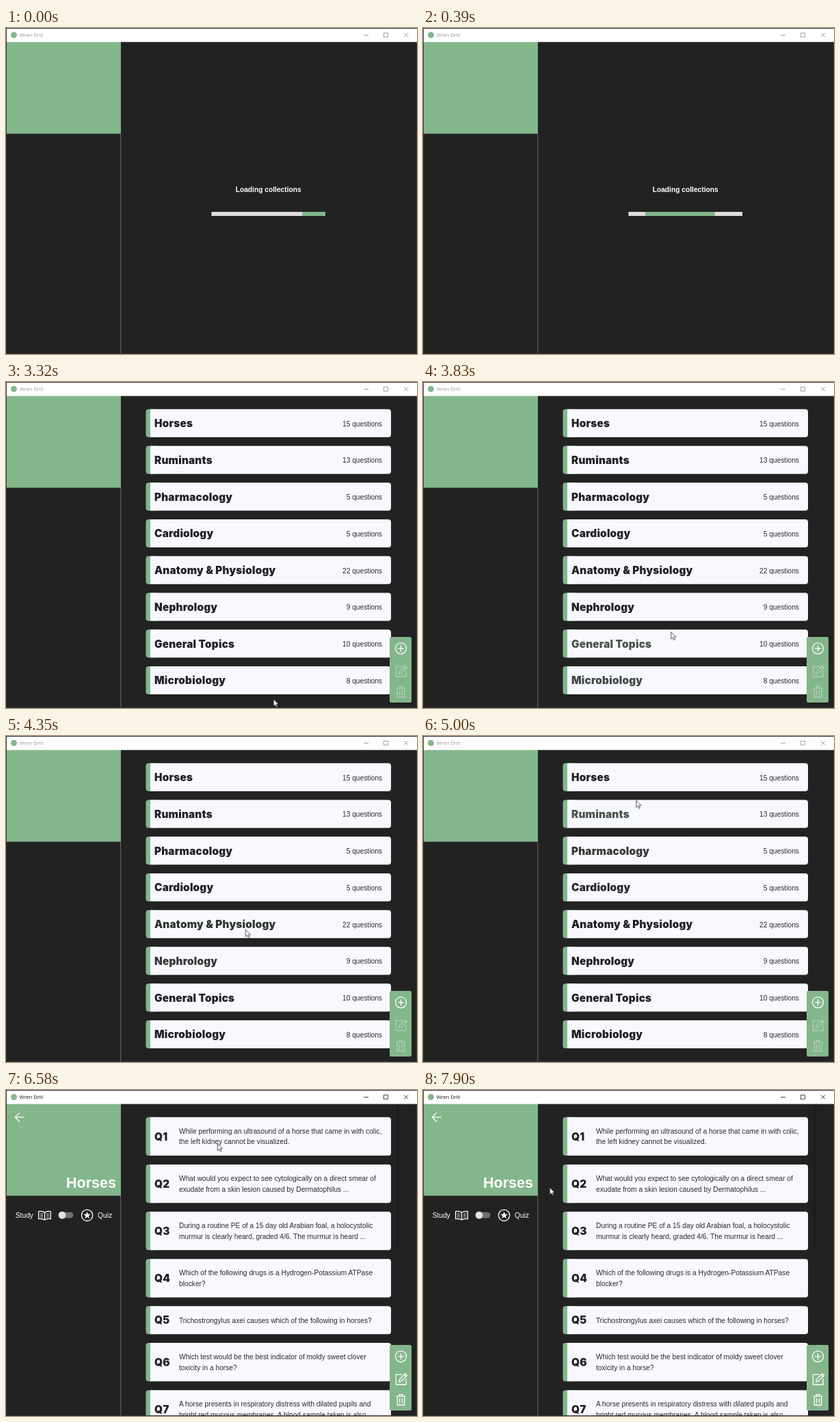
Write an HTML page that moves like this. It is 601 px wide and 477 px high and loops after 8000 ms.

```html
<!DOCTYPE html>
<html lang="en">
<head>
<meta charset="utf-8">
<title>Wren Drill</title>
<style>
  html, body { margin: 0; width: 100%; height: 100%; overflow: hidden; background: #222; }
  svg { display: block; width: 601px; height: 477px; }
  text { font: 10.24px "Liberation Sans", Arial, sans-serif; fill: #2a2a2c; white-space: pre; }
  .bold { font-weight: 700; fill: #fff; }
  .big { font-size: 21.5px; }
  .light { fill: #fff; }
  .black { font: 900 15.3px Inter, "Liberation Sans", sans-serif; letter-spacing: .2px; fill: #222224; }
  .app { font: 7.5px "Open Sans", "Noto Sans", sans-serif; }
  .green { fill: #84b68c; }
  .paper { fill: #f8f9ff; }
  .line { fill: none; stroke: #fff; stroke-width: 1.3; }

  /* one loop lasts 8 s: 1% = 80 ms */
  .loading, .list, .quiz, .panel, .tools, .tint, .ink, .cursor, .bar, .hover, .picked, .count {
    animation: 8s step-end infinite;
  }
  .loading { animation-name: loading; }
  .list { animation-name: list; }
  .quiz { animation-name: quiz; }
  .panel { animation-name: panel; }
  .tools { animation-name: tools; }
  .tint { animation-name: focus-fill; }
  .ink { animation-name: focus-line; fill: none; stroke-width: .8; }
  .cursor { animation-name: cursor; }
  .bar { animation-name: slide; }
  .bar.second { animation-name: enter; }
  .hover { animation-name: hover; animation-delay: calc((var(--at) - 8000) * 1ms); }
  .picked { animation-name: picked; }
  .count { animation-name: count; }

  @keyframes loading { 0% { opacity: 1 } 8.25%, to { opacity: 0 } }
  @keyframes list { 0% { opacity: 0 } 8.25% { opacity: 1 } 82.25%, to { opacity: 0 } }
  @keyframes quiz { 0% { opacity: 0 } 82.25%, to { opacity: 1 } }
  @keyframes panel { 0% { opacity: 0 } 8.25%, to { opacity: 1 } }
  @keyframes tools { 0% { opacity: .36 } 82.25%, to { opacity: 1 } }
  @keyframes focus-fill { 0% { fill: #999 } 75.75%, to { fill: #111 } }
  @keyframes focus-line { 0% { stroke: #888 } 75.75%, to { stroke: #111 } }

  @keyframes slide {
    0% { transform: translateX(132.5px) }
    1.625% { transform: translateX(155px) }
    3.25%, to { transform: translateX(167px) }
  }
  @keyframes enter {
    0% { transform: translateX(-167px) scaleX(.6) }
    1.625% { transform: translateX(-67px) scaleX(.6) }
    3.25% { transform: translateX(-10px) scaleX(.6) }
    4.875%, to { transform: translateX(25px) scaleX(.61) }
  }

  @keyframes hover {
    0% { fill: #303531 }
    1.625% { fill: #4a544c }
    3.25% { fill: #434944 }
    4.875% { fill: #363936 }
    6.5% { fill: #2a2c2a }
    8.125%, to { fill: #222224 }
  }
  @keyframes picked {
    0% { fill: #222224 }
    67.625% { fill: #3f4b42 }
    69.25% { fill: #5f7b66 }
    70.875% { fill: #84b68c }
    77.75%, to { fill: #9cc3a5 }
  }
  @keyframes count { 0% { fill: #2a2a2c } 77.75%, to { fill: #53625a } }

  @keyframes cursor {
    0% { transform: translate(-20px, 0) }
    41.5% { transform: translate(391px, 464px) }
    43% { transform: translate(383px, 436px) }
    44.625% { transform: translate(375px, 408px) }
    46.25% { transform: translate(367px, 384px) }
    47.875% { transform: translate(362.5px, 365.5px) }
    49.5% { transform: translate(359px, 340px) }
    51.125% { transform: translate(358px, 323px) }
    52.75% { transform: translate(356px, 312px) }
    54.375% { transform: translate(350px, 283px) }
    56% { transform: translate(342px, 232px) }
    57.625% { transform: translate(333px, 180px) }
    59.25% { transform: translate(325px, 143px) }
    60.875% { transform: translate(317px, 112px) }
    62.5% { transform: translate(311.5px, 94px) }
    64.125% { transform: translate(311px, 86px) }
    65.75% { transform: translate(309px, 78px) }
    87.25% { transform: translate(278px, 95px) }
    88.875% { transform: translate(222px, 123px) }
    90.5% { transform: translate(184.5px, 139px) }
    92.25% { transform: translate(184px, 142.5px) }
    98.75%, to { transform: translate(185px, 142.5px) }
  }
</style>
</head>
<body>
<svg viewBox="0 0 601 477">
  <defs><clipPath id="track"><rect x="300.5" y="269" width="166.5" height="6"/></clipPath></defs>
  <rect width="601" height="477" fill="#222"/>
  <path d="M167.7 155V476" stroke="#555" stroke-width="1.4"/>
  <rect class="green" x="1" y="20" width="167" height="134.7"/>

  <g class="loading">
    <text class="bold" x="383.7" y="240.3" text-anchor="middle">Loading collections</text>
    <g clip-path="url(#track)">
      <rect x="300" y="269" width="167" height="6" fill="#e0dcdf"/>
      <g transform="translate(300 269)">
        <rect class="bar green" width="167" height="6"/>
        <rect class="bar second green" width="167" height="6"/>
      </g>
    </g>
  </g>

  <g class="list" id="list"></g>

  <g class="quiz">
    <path class="line" d="M27 39.8H13.6M19.8 33.4L13.4 39.8L19.8 46.2"/>
    <text class="bold big" x="161" y="143" text-anchor="end">Horses</text>
    <text class="light" x="13.8" y="187">Study</text>
    <path class="line" stroke-linejoin="round" d="M56.5 179.3Q53 176.6 47.7 177.6V188.6Q53 187.8 56.5 190Q60 187.8 65.3 188.6V177.6Q60 176.6 56.5 179.3V190"/>
    <path class="line" style="stroke-width:.8" d="M50 180.8l4 .7M50 183.2l4 .7M50 185.6l4 .7M63 180.8l-4 .7M63 183.2l-4 .7M63 185.6l-4 .7"/>
    <rect x="77.5" y="178.8" width="21" height="8.6" rx="4.3" fill="#707070"/>
    <circle cx="82" cy="183.1" r="5.4" fill="#e4e4e4"/>
    <circle class="line" cx="118.6" cy="183.3" r="8.2"/>
    <path id="star" fill="#fff"/>
    <text class="light" x="134" y="187">Quiz</text>
    <rect x="570.5" y="21" width="4.5" height="207" fill="#1d1d1d"/>
    <g id="questions"></g>
  </g>

  <g class="panel">
    <rect class="green" x="561" y="373" width="32" height="96" rx="2"/>
    <g class="line">
      <circle cx="577.5" cy="389.8" r="8"/>
      <path d="M577.5 385.2v9.2M572.9 389.8h9.2"/>
      <g class="tools">
        <path d="M579.5 416.4H570.4V431H585V422.5"/>
        <path stroke-linejoin="round" d="M574.6 427l.8-3.6L583.8 415l2.7 2.7-8.4 8.4zM582 416.8l2.7 2.7"/>
        <path d="M571 448.2h13M575 448v-2.3h5V448M572.3 448.4V461h10.4V448.4M575.6 451v7.5M579.4 451v7.5"/>
      </g>
    </g>
  </g>

  <path d="M600.5 20V476.5H.5V.5H601" fill="none" stroke="#333"/>
  <rect x="1" y="1" width="600" height="19.5" fill="#fff"/>
  <circle class="green" cx="11.5" cy="10.2" r="4.5"/>
  <text class="app tint" x="19.8" y="13.2">Wren Drill</text>
  <path class="ink" d="M523 10.5h7M552.4 7.3h6v6h-6zM582 7.3l6 6M588 7.3l-6 6"/>

  <g class="cursor">
    <path transform="scale(.64)" d="M.5 .5V16.5L4.2 13L6.8 18.8L9.3 17.7L6.8 12H11.8Z" fill="#fff" stroke="#111" stroke-width="1.1"/>
  </g>
</svg>
<script type="module">
  const byId = id => document.getElementById(id);

  const card = (y, h) => `
    <rect class="green" x="204.5" y="${y}" width="20" height="${h}" rx="4"/>
    <path class="paper" d="M211 ${y}H559a4 4 0 0 1 4 4v${h - 8}a4 4 0 0 1 -4 4H211z"/>`;

  // name, number of questions, time the pointer passes over
  const topics = [
    ["Horses", 15],
    ["Ruminants", 13, 4870],
    ["Pharmacology", 5, 4610],
    ["Cardiology", 5, 4480],
    ["Anatomy &amp; Physiology", 22, 4350],
    ["Nephrology", 9, 3960],
    ["General Topics", 10, 3700],
    ["Microbiology", 8, 3570],
  ];
  byId("list").innerHTML = topics.map(([name, count, at], i) => {
    const y = 39.8 + i * 53.75;
    return card(y, 41) +
      `<text class="black ${at ? "hover" : "picked"}" style="--at:${at || 0}" x="217" y="${y + 26.2}">${name}</text>
       <text class="${at ? "" : "count"}" x="550" y="${y + 24.8}" text-anchor="end">${count} questions</text>`;
  }).join("");

  const questions = [
    ["While performing an ultrasound of a horse that came in with colic,", "the left kidney cannot be visualized."],
    ["What would you expect to see cytologically on a direct smear of", "exudate from a skin lesion caused by Dermatophilus ..."],
    ["During a routine PE of a 15 day old Arabian foal, a holocystolic", "murmur is clearly heard, graded 4/6. The murmur is heard ..."],
    ["Which of the following drugs is a Hydrogen-Potassium ATPase", "blocker?"],
    ["Trichostrongylus axei causes which of the following in horses?"],
    ["Which test would be the best indicator of moldy sweet clover", "toxicity in a horse?"],
    ["A horse presents in respiratory distress with dilated pupils and", "bright red mucous membranes. A blood sample taken is also ..."],
  ];
  let cardY = 39.8;
  byId("questions").innerHTML = questions.map((lines, i) => {
    const h = 25.6 + lines.length * 15.36, mid = cardY + h / 2;
    const first = mid + 3.8 - (lines.length - 1) * 7.68;
    const html = card(cardY, h) +
      `<text class="black" x="217" y="${mid + 5.7}">Q${i + 1}</text>` +
      lines.map((line, n) => `<text x="253" y="${first + n * 15.36}">${line}</text>`).join("");
    cardY += h + 12.8;
    return html;
  }).join("");

  const points = Array.from({ length: 10 }, (_, i) => {
    const r = i % 2 ? 2.3 : 5.6, a = i * Math.PI / 5;
    return `${118.6 + r * Math.sin(a)} ${183.5 - r * Math.cos(a)}`;
  });
  byId("star").setAttribute("d", `M${points.join("L")}Z`);
</script>
</body>
</html>
```
